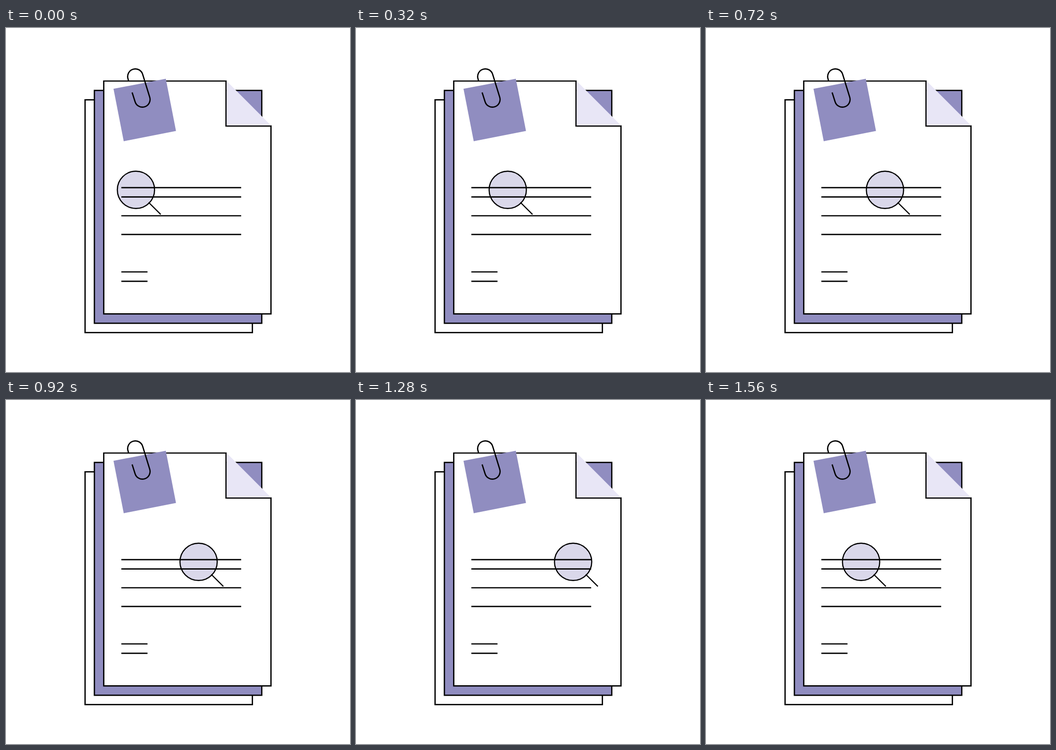
An HTML page for the animation above (1600 ms loop, 720 px wide and 720 px high).

```html
<!DOCTYPE html>
<html lang="en">
<head>
<meta charset="utf-8">
<title>Document search</title>
<style>
  html, body { margin: 0; width: 100%; height: 100%; overflow: hidden; background: #fff; }
  svg { display: block; width: 100%; height: 100%; }
</style>
</head>
<body>
<svg viewBox="0 0 720 720" fill="none" stroke="#000" stroke-width="2.7">
  <!-- paper stack -->
  <rect x="165.5" y="150.3" width="350.2" height="487.2" fill="#fff"/>
  <rect x="185" y="130.7" width="350.3" height="487.3" fill="#908dc0"/>
  <path d="M204.6 111H460.5V205.2H554.6V598.4H204.6Z" fill="#fff"/>
  <path d="M461.8 111L554.6 203.9H461.8Z" fill="#e8e6f6" stroke="none"/>

  <!-- note and clip -->
  <path d="M225 127.3L334.5 106.3L355.8 215.5L246.4 237Z" fill="#908dc0" stroke="none"/>
  <path d="M256.4 109.8L255.3 106.1A16 16 0 0 1 286.1 97.1L300.9 145.1A16 16 0 0 1 270.1 154.1L264 134.8"/>

  <g id="lens" stroke-width="2.4">
    <circle cy="338.7" r="39" fill="#dad8ea"/>
    <path d="M26.5 365L51.8 390.2"/>
  </g>

  <!-- text lines -->
  <path d="M241.4 334.1H492.2M241.4 353.6H492.2M241.4 393H492.2M241.4 432.2H492.2M241.4 510.5H296.2M241.4 530.1H296.2"/>
</svg>
<script>
  const LOOP = 1600, STEP = 40;
  const TURN = 1348, START_X = 272, OUT_SPEED = 0.1425, BACK_SPEED = 0.658;
  const lens = document.getElementById('lens');

  // Slow sweep to the right, then a quick return.
  function lensX(t) {
    const out = OUT_SPEED * Math.min(t, TURN);
    const back = BACK_SPEED * Math.max(0, t - TURN);
    return START_X + out - back;
  }

  function draw() {
    const t = Math.floor(performance.now() % LOOP / STEP) * STEP;
    lens.setAttribute('transform', `translate(${lensX(t)} 0)`);
    requestAnimationFrame(draw);
  }
  draw();
</script>
</body>
</html>
```
